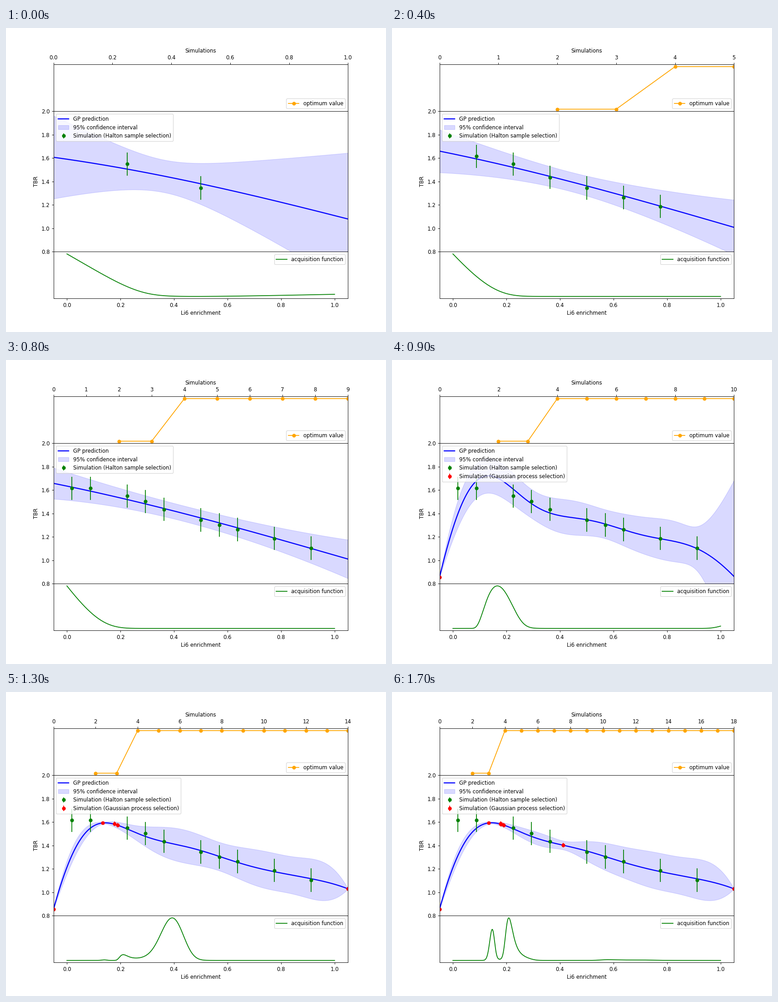
Animation, 837 px wide and 669 px high, one loop 1800 ms. Source, as a matplotlib script:

```python
import math
import numpy as np
import matplotlib.pyplot as plt
from matplotlib.animation import FuncAnimation

FRAMES, INTERVAL = 18, 100
WIDTH, HEIGHT, DPI = 837, 669, 83.7
X = np.linspace(0, 1, 601)

# results at successive Halton abscissas
HALTON_Y = [1.345, 1.549, 1.187, 1.615, 1.263, 1.436, 1.105, 1.615, 1.303, 1.503]
HALTON_ERR = 0.1
# simulations picked by the Gaussian process: x, y, error
PICKED = [(0, 0.856, 0.005), (0.1674, 1.592, 0.005), (1, 1.03, 0.005),
          (0.2176, 1.575, 0.02), (0.2075, 1.586, 0.02), (0.209, 1.582, 0.02),
          (0.2085, 1.584, 0.02), (0.2075, 1.585, 0.02), (0.4205, 1.402, 0.02)]

erfc = np.vectorize(math.erfc)


def halton(i):
    """Radical inverse of i in base 2."""
    value, step = 0.0, 0.5
    while i:
        value += step * (i & 1)
        i, step = i >> 1, step / 2
    return value


def samples(k):
    """Halton and picked simulations known at step k, as x, y, error rows."""
    known = HALTON_Y[:k + 2]
    first = [(halton(i), y, HALTON_ERR) for i, y in enumerate(known, 1)]
    return np.array(first), np.array(PICKED[:max(k - 8, 0)]).reshape(-1, 3)


def predict(x, y, err, amp, length):
    """Zero-mean Gaussian process: mean and deviation over X."""
    def kernel(a, b):
        return amp**2 * np.exp(-(a[:, None] - b)**2 / (2 * length**2))

    cross = kernel(X, x)
    weights = np.linalg.solve(kernel(x, x) + np.diag(err**2), cross.T)
    var = amp**2 - (cross * weights.T).sum(axis=1)
    return y @ weights, np.sqrt(np.maximum(var, 1e-8))


def improvement(mean, sigma, best):
    """Expected improvement over the best value, scaled to 0..1."""
    z = (mean - best) / sigma
    pdf = np.exp(-z * z / 2) / math.sqrt(2 * math.pi)
    gain = sigma * np.maximum(pdf + z * erfc(-z / math.sqrt(2)) / 2, 0)
    return (gain - gain.min()) / np.ptp(gain)


def draw_optimum(ax, k):
    runs = np.arange(2, k + 2)
    ax.plot(runs, np.where(runs < 4, 0, 1), "-o", color="orange",
            label="optimum value")
    ax.set(xlim=(0, k + 1), ylim=(-0.05, 1.05), yticks=[])
    ax.xaxis.tick_top()
    ax.xaxis.set_label_position("top")
    ax.set_xlabel("Simulations")
    ax.legend(loc="lower right")


def draw_points(ax, rows, color, kind):
    if len(rows):
        x, y, err = rows.T
        ax.errorbar(x, y, yerr=err, fmt="o", color=color,
                    label=f"Simulation ({kind} selection)")


def draw_prediction(ax, mean, sigma, first, picked):
    half = 1.96 * sigma
    ax.plot(X, mean, color="blue", lw=2, label="GP prediction")
    ax.fill_between(X, mean - half, mean + half, color="blue", alpha=0.15,
                    label="95% confidence interval")
    draw_points(ax, first, "green", "Halton sample")
    draw_points(ax, picked, "red", "Gaussian process")
    ax.set(xlim=(0, 1), ylim=(0.8, 2.0), xticks=[], ylabel="TBR")
    ax.legend(loc="upper left")


def draw_acquisition(ax, curve):
    ax.plot(X, curve, color="green", label="acquisition function")
    ax.set(xlim=(-0.05, 1.05), ylim=(-0.05, 1.05), yticks=[],
           xlabel="Li6 enrichment")
    ax.legend(loc="upper right")


# the tiny margin keeps the pixel size from rounding down
fig, (top, middle, bottom) = plt.subplots(
    3, 1, figsize=((WIDTH + 1e-6) / DPI, (HEIGHT + 1e-6) / DPI), dpi=DPI,
    gridspec_kw=dict(height_ratios=[1, 3, 1], hspace=0, left=0.125,
                     right=0.9, bottom=0.11, top=0.88))


def draw(k):
    for ax in (top, middle, bottom):
        ax.clear()
    first, picked = samples(k)
    x, y, err = np.vstack([first, picked]).T
    # a smooth trend suffices until the drop at zero is seen
    amp, length = (1.25, 0.22) if len(picked) else (1.45, 2.4 - 0.75 / len(x))
    mean, sigma = predict(x, y, err, amp, length)
    draw_optimum(top, k)
    draw_prediction(middle, mean, sigma, first, picked)
    draw_acquisition(bottom, improvement(mean, sigma, y.max()))
    return []


anim = FuncAnimation(fig, draw, frames=FRAMES, init_func=lambda: [],
                     interval=INTERVAL, repeat=True, repeat_delay=0)
plt.show()
```
